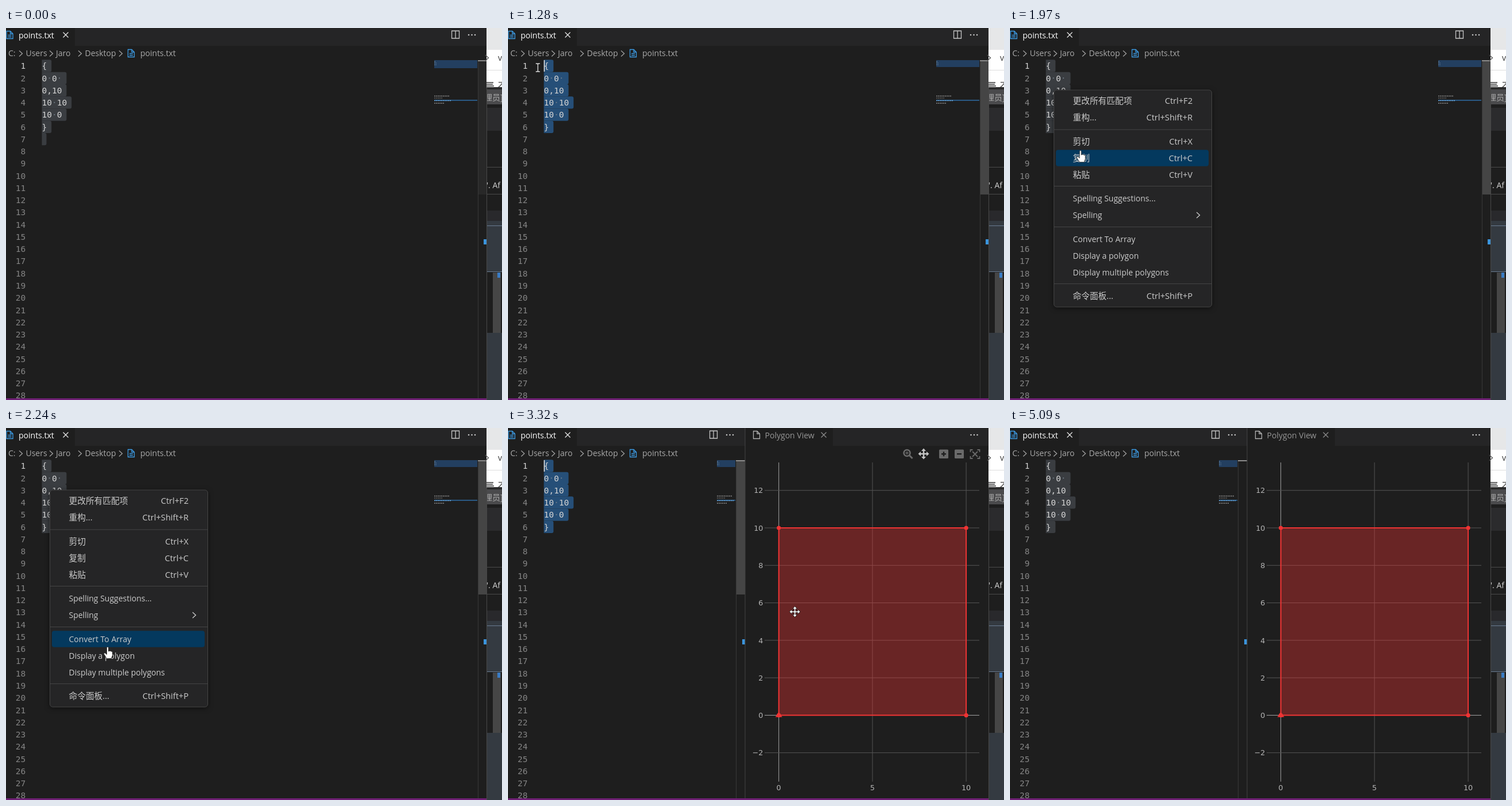
An HTML page that plays this animation: 864x648 px, repeating every 5.16 s.

```html
<!DOCTYPE html>
<html lang="en">
<head>
<meta charset="utf-8">
<title>Polygon View</title>
<style>
  html, body { margin: 0; width: 100%; height: 100%; overflow: hidden; background: #1e1e1e; }
  svg { display: block; width: 864px; height: 648px; }
  text { font-family: "Open Sans", "Noto Sans CJK SC", "Noto Sans CJK", sans-serif; font-size: 14px; white-space: pre; }
  .code { font-family: "DejaVu Sans Mono", monospace; font-size: 14.5px; fill: #d4d4d4; }
  .num { text-anchor: end; fill: #858585; }
  .num.on { fill: #d0d0d0; }
  .tick { font-family: "DejaVu Sans", sans-serif; font-size: 12.8px; fill: #b4b4b4; }
  .crumb { fill: #a9a9a9; }
  .cjk { font-size: 14.7px; }
  .line { fill: none; stroke-width: 1.3; }
</style>
</head>
<body>
<svg id="stage" viewBox="0 0 864 648"></svg>
<script>
const LOOP = 5160, STEP = 67.89, ROW = 21.26, CHAR = 8.74, LEFT = 62.5;
const lines = ['{', '0 0 ', '0,10', '10 10', '10 0', '}', ''];
const rowY = n => 66 + ROW * (n - 1);
const $ = id => document.getElementById(id);
const rep = (n, f) => Array.from({ length: n }, (_, i) => f(i)).join('');

const rect = (x, y, w, h, fill, more = '') =>
  `<rect x="${x}" y="${y}" width="${w}" height="${h}" fill="${fill}" ${more}/>`;
const path = (d, stroke, more = '') => `<path class="line" d="${d}" stroke="${stroke}" ${more}/>`;
const text = (x, y, s, more = '') => `<text x="${x}" y="${y}" ${more}>${s}</text>`;
const group = (id, body, more = '') => `<g id="${id}" ${more}>${body}</g>`;
const cross = (x, y, r, c) => path(`M${x - r} ${y - r}l${2 * r} ${2 * r}m0 ${-2 * r}l${-2 * r} ${2 * r}`, c);
const chevron = (x, y, c) => path(`M${x - 3} ${y - 5}l5.5 5l-5.5 5`, c);
const dots = x => rep(3, i => `<circle cx="${x - 5.5 + i * 5.5}" cy="12" r="1.3" fill="#c5c5c5"/>`);
const sheet = (x, y, c) =>
  path(`M${x - 5.5} ${y - 6.5}h6.5l4.5 4.5v8.5h-11zM${x + 1} ${y - 6.5}v4.5h4.5`, c);
const docIcon = (x, y) => sheet(x, y, '#3c9be4') + path(`M${x - 3} ${y + .5}h6m-6 3h6`, '#3c9be4');

function windowBase() {
  const crumbs = [[4, 'C:'], [34.5, 'Users'], [87, 'Jaro'], [137.5, 'Desktop'], [234, 'points.txt']];
  return rect(0, 0, 837, 648, '#1e1e1e') + rect(120, 0, 717, 31, '#252526') +
    docIcon(6.5, 12) + text(22, 17.5, 'points.txt', 'fill="#fff" font-size="13.8"') + cross(104, 12, 4.5, '#e8e8e8') +
    crumbs.map(([x, s]) => text(x, 49, s, 'class="crumb"')).join('') +
    [26, 79, 129, 200].map(x => chevron(x, 44.5, '#a0a0a0')).join('') + docIcon(218, 44);
}

// Minimap, scrollbar and buttons of an editor ending at x = right.
function editorSide(id, mapX, barX, right) {
  const w = barX - mapX - 1, icon = right === 837 ? 783 : 358;
  const tiny = (y, n, c) => path(`M${mapX} ${y}h${n}`, c, 'stroke-dasharray="2 1"');
  return group(id,
    rect(mapX, 56, w, 12, '#233f60', `id="${id}Map"`) +
    tiny(58.5, 3, '#56728c') + tiny(61, 4, '#56728c') + tiny(64, 4, '#56728c') +
    tiny(118.5, 26, '#8a8a8a') + tiny(122, 14, '#666') + tiny(131, 17, '#8a8a8a') +
    rect(mapX, 125, w, 1.8, '#2b608f') + tiny(126.5, 30, '#6ea6d8') +
    rect(barX, 56, right - barX, 234, '#454545', `id="${id}Thumb"`) +
    rect(barX, 56, 1, 589, '#383838') +
    rect(barX, 56, right - barX, 2, '#8c8c8c', `id="${id}Mark"`) +
    rect(right - 5, 368, 5, 9, '#3a94dc') +
    path(`M${icon - 6.5} 5h13v13h-13zM${icon} 5v13`, '#c5c5c5') + dots(icon + 28.5));
}

function backWindow() {
  return rect(837, 0, 27, 648, '#1e1e1e') + rect(837, 0, 27, 38, '#e6e7e8') + rect(837, 38, 27, 65, '#fff') +
    rect(837, 73, 27, 1, '#ddd') + chevron(838, 52, '#555') + text(857, 57, 'v', 'fill="#333"') +
    path('M837 95h12m-12 3h11m-11 3h13', '#333') + text(857, 103, '才', 'fill="#333"') +
    rect(837, 103, 27, 4, '#2b2b2b') + rect(837, 107, 27, 26, '#4a4a4c') +
    '<svg x="837" y="105" width="27" height="28">' + text(-4, 21, '理员]', 'fill="#a8a8a8"') + '</svg>' +
    rect(837, 139, 27, 40, '#2b2b2d') + rect(837, 242, 27, 1, '#4a4a4a') +
    text(837, 279, '\'. Af', 'fill="#d0d0d0" font-size="15"') + rect(837, 289, 27, 1, '#4a4a4a') +
    rect(837, 318, 27, 18, '#29292c') + rect(837, 336, 27, 89, '#343a41') +
    rect(837, 344, 27, 1, '#6a7c92') + rect(837, 424, 27, 1, '#6a7c92') +
    rect(848, 426, 14, 105, '#464646') + rect(856, 426, 5, 9, '#3a7cc4') +
    rect(837, 531, 27, 117, '#343a41') + rect(837, 103, 1, 545, '#484848');
}

function panel() {
  return rect(413, 0, 424, 645, '#1e1e1e') + rect(566, 0, 271, 31, '#252526') + rect(412.5, 0, 1, 645, '#444') +
    sheet(433, 12, '#b0b0b0') + text(447.5, 17.5, 'Polygon View', 'fill="#969696"') +
    cross(550, 12, 4.5, '#8c8c8c') + dots(812);
}

function chart() {
  const X = v => 471.7 + v * 32.64, Y = v => 500.4 - v * 32.64;
  const grid = v => v ? '#555' : '#a5a5a5';
  const corners = [[0, 10], [10, 10], [10, 0], [0, 0]];
  const xs = [5, 10, 0], ys = [-2, 2, 4, 6, 8, 10, 12, 0];
  return xs.map(v => path(`M${X(v)} 60V616`, grid(v), 'style="stroke-width:1"') +
      text(X(v), 631, v, 'class="tick" text-anchor="middle"')).join('') +
    ys.map(v => path(`M447 ${Y(v)}H821`, grid(v), 'style="stroke-width:1"') +
      text(444.5, Y(v) + 4.7, String(v).replace('-', '−'), 'class="tick" text-anchor="end"')).join('') +
    `<rect x="${X(0)}" y="${Y(10)}" width="326.4" height="326.4" fill="#ef3333" fill-opacity=".36" stroke="#ef3333" stroke-width="2"/>` +
    corners.map(([x, y]) => `<circle cx="${X(x)}" cy="${Y(y)}" r="3.6" fill="#ef3333"/>`).join('') +
    `<path d="M${X(0)} ${Y(0) - 6}l6 9h-12z" fill="#ef3333"/>`;
}

function modeBar() {
  const box = (x, d) => rect(x - 8, 37.5, 16, 15.5, '#6a6a6a', 'rx="1.5"') + path(`M${x - 4} 45.2h8${d}`, '#1e1e1e', 'style="stroke-width:2.4"');
  return '<circle cx="695" cy="43.5" r="5.5" fill="none" stroke="#6a6a6a" stroke-width="2.6"/>' +
    path('M699 47.5l5.5 5.5', '#6a6a6a', 'style="stroke-width:3"') + path('M692 43.5h6m-3 -3v6', '#6a6a6a') +
    `<g transform="translate(724 45)">${moveShape('#c4c4c4')}</g>` +
    box(759, 'm-4 -4v8') + box(786, '') +
    path('M805.5 42v-4h4m8 0h4v4m0 7v4h-4m-8 0h-4v-4M809 41l9 9m0 -9l-9 9', '#6a6a6a', 'style="stroke-width:1.8"');
}

const moveShape = (fill, more = '') =>
  `<path d="M0 -9.5l4 4.5h-2.8v3.8h3.8v-2.8l4.5 4l-4.5 4v-2.8h-3.8v3.8h2.8l-4 4.5l-4 -4.5h2.8v-3.8h-3.8v2.8l-4.5 -4l4.5 -4v2.8h3.8v-3.8h-2.8z" fill="${fill}" ${more}/>`;

const items = [
  [127, '更改所有匹配项', 'Ctrl+F2'], [156, '重构...', 'Ctrl+Shift+R'],
  [198, '剪切', 'Ctrl+X'], [227, '复制', 'Ctrl+C'], [256, '粘贴', 'Ctrl+V'],
  [297, 'Spelling Suggestions...'], [326, 'Spelling'],
  [368, 'Convert To Array'], [397, 'Display a polygon'], [426, 'Display multiple polygons'],
  [467, '命令面板...', 'Ctrl+Shift+P']
];

function menu() {
  return rect(76.5, 108, 275, 378, '#252526', 'rx="5" stroke="#454545" style="filter:drop-shadow(0 2px 4px #0008)"') +
    rect(80, 382, 266, 28.5, '#04395e', 'id="hover" rx="4"') +
    [177, 275.5, 346.5, 445.5].map(y => rect(77, y - .5, 274, 1, '#454545')).join('') +
    items.map(([y, s, key]) => text(109.5, y + 5, s, `fill="#ccc" ${/[a-z]/.test(s) ? '' : 'class="cjk"'}`) +
      (key ? text(318, y + 5, key, 'fill="#ccc" text-anchor="end" style="font-size:14.6px"') : '')).join('') +
    chevron(328, 326, '#ccc');
}

const cursors = {
  ibeam: path('M-3.5 -7h2.5l1 1l1 -1h2.5M-3.5 7h2.5l1 -1l1 1h2.5M0 -6v12', '#e8e8e8'),
  arrow: '<path d="M0 0v16l3.8 -3.5l2.6 6l2.6 -1.2l-2.6 -5.8h5.2z" fill="#fff" stroke="#222" stroke-width=".8"/>',
  hand: '<path d="M-1.5 1.5q1.5 -2.5 3 0v6.5l2.5 -.8l2.3 .9l2.2 1v6l-2 5.5h-8l-5 -8q0 -2.3 2 -1.6l3 2.5z" fill="#fff" stroke="#222" stroke-width=".8"/>',
  move: moveShape('#fff', 'stroke="#111" stroke-width=".8"')
};

$('stage').innerHTML =
  windowBase() + group('sel', '') +
  rep(28, i => text(34.3, rowY(i + 1) + 5.3, i + 1, 'class="code num"')) +
  lines.map((s, i) => text(LEFT, rowY(i + 1) + 5.3, s, 'class="code"')).join('') +
  rect(0, 56, 1.6, 20, '#e0e0e0', 'id="caret"') +
  editorSide('full', 746, 822, 837) +
  group('split', editorSide('half', 364, 397, 413) + panel() + group('chart', chart()) + group('modes', modeBar())) +
  rect(0, 645, 837, 3, '#6d1f73') + backWindow() + group('menu', menu()) +
  group('mouse', '<circle id="press" cx="-2.5" cy="0" r="11" fill="#c8bc10" fill-opacity=".8"/>' +
    Object.entries(cursors).map(([k, s]) => group(k, s)).join(''));

// Pointer path: time, x, y
const track = [
  [68, 640, 630], [200, 480, 520], [340, 300, 370], [543, 124, 225], [611, 92, 203], [679, 70, 196],
  [815, 75, 132], [950, 66, 84], [1086, 62, 60], [1150, 62, 60], [1222, 57, 62], [1358, 47, 76],
  [1561, 70, 100], [1629, 76, 109], [1697, 77, 110], [1900, 105, 165], [2036, 140, 260], [2172, 172, 360],
  [2240, 177, 381], [2500, 177, 381], [2700, 225, 385], [3055, 318, 370], [3191, 400, 360], [3327, 500, 320],
  [3462, 535, 230], [3530, 557, 176], [3666, 640, 170], [3802, 735, 255], [3938, 796, 341],
  [4005, 810, 353], [4080, 814, 362], [4150, 820, 390], [4300, 832, 520], [4415, 838, 628]
];
function pointer(t) {
  const i = track.findIndex(k => k[0] >= t);
  if (i < 0) return track[track.length - 1].slice(1);
  if (!i) return track[0].slice(1);
  const [t0, x0, y0] = track[i - 1], [t1, x1, y1] = track[i], p = (t - t0) / (t1 - t0);
  return [x0 + (x1 - x0) * p, y0 + (y1 - y0) * p];
}

const clamp = (v, a, b) => Math.min(b, Math.max(a, v));
const show = (id, on) => { $(id).style.display = on ? '' : 'none'; };
const nums = document.querySelectorAll('.num');

function selection(row, col, last, color) {
  let out = '';
  for (let n = row; n <= last; n++) {
    const s = lines[n - 1], from = n === row ? col : 0;
    const x = LEFT + from * CHAR, y = rowY(n) - ROW / 2, end = LEFT + s.length * CHAR + 8;
    out += `<path d="M${x} ${y}H${end - 3}q3 0 3 3v${ROW - 6}q0 3 -3 3H${x}z" fill="${color}"/>`;
    for (let c = from; c < s.length; c++)
      if (s[c] === ' ') out += `<circle cx="${LEFT + (c + .5) * CHAR}" cy="${rowY(n)}" r="1" fill="#76838f"/>`;
  }
  return out;
}

function draw(t) {
  const [x, y] = pointer(t);
  const inside = t > 60 && t < 4475;
  const drag = t > 670 && t < 1215;
  const menuOn = t > 1620 && t < 2505;
  const split = t > 2710, plot = t > 3250;

  let row = 1, col = 0;
  if (drag) {
    row = clamp(Math.round((y - 66) / ROW) + 1, 1, 7);
    col = clamp(Math.round((x - 60) / CHAR), 0, lines[row - 1].length);
  }
  const last = t < 670 ? 7 : 6;
  const focus = t > 670 && !menuOn && t < 5085;
  $('sel').innerHTML = selection(row, col, last, focus ? '#264f78' : '#3a3d41');
  nums.forEach((n, i) => n.classList.toggle('on', i === row - 1));

  const blinkOff = (t > 3500 && t < 3990) || (t > 4475 && t < 4950);
  show('caret', focus && !blinkOff);
  $('caret').setAttribute('x', LEFT + col * CHAR);
  $('caret').setAttribute('y', rowY(row) - 10);

  for (const id of ['full', 'half']) {
    $(id + 'Map').setAttribute('y', 54 + 2 * row);
    $(id + 'Map').setAttribute('height', Math.max(0, 2 * (last - row + 1)));
    $(id + 'Mark').setAttribute('y', 48 + 8 * row);
    $(id + 'Thumb').style.opacity = t < 60 ? .25 : clamp((4000 - t) / 400, 0, 1);
  }
  show('full', !split);
  show('split', split);
  show('chart', plot);
  show('modes', plot && inside && x > 413 && x < 825);

  const hit = x > 80 && items.find(([c]) => Math.abs(y - c) < 14.6);
  show('menu', menuOn);
  show('hover', hit);
  if (hit) $('hover').setAttribute('y', hit[0] - 14.8);

  show('mouse', inside);
  $('mouse').setAttribute('transform', `translate(${x} ${y})`);
  show('press', drag);
  const kind = menuOn ? (hit ? 'hand' : 'arrow')
    : split && x > 413 ? (plot && x < 821 ? 'move' : 'arrow') : 'ibeam';
  for (const k in cursors) show(k, k === kind);
}

const start = performance.now();
let prev = -1;
function tick() {
  const t = (performance.now() - start) % LOOP;
  const step = Math.min(75, Math.floor((t + 12) / STEP));
  if (step !== prev) draw((prev = step) * STEP);
  requestAnimationFrame(tick);
}
tick();
</script>
</body>
</html>
```
